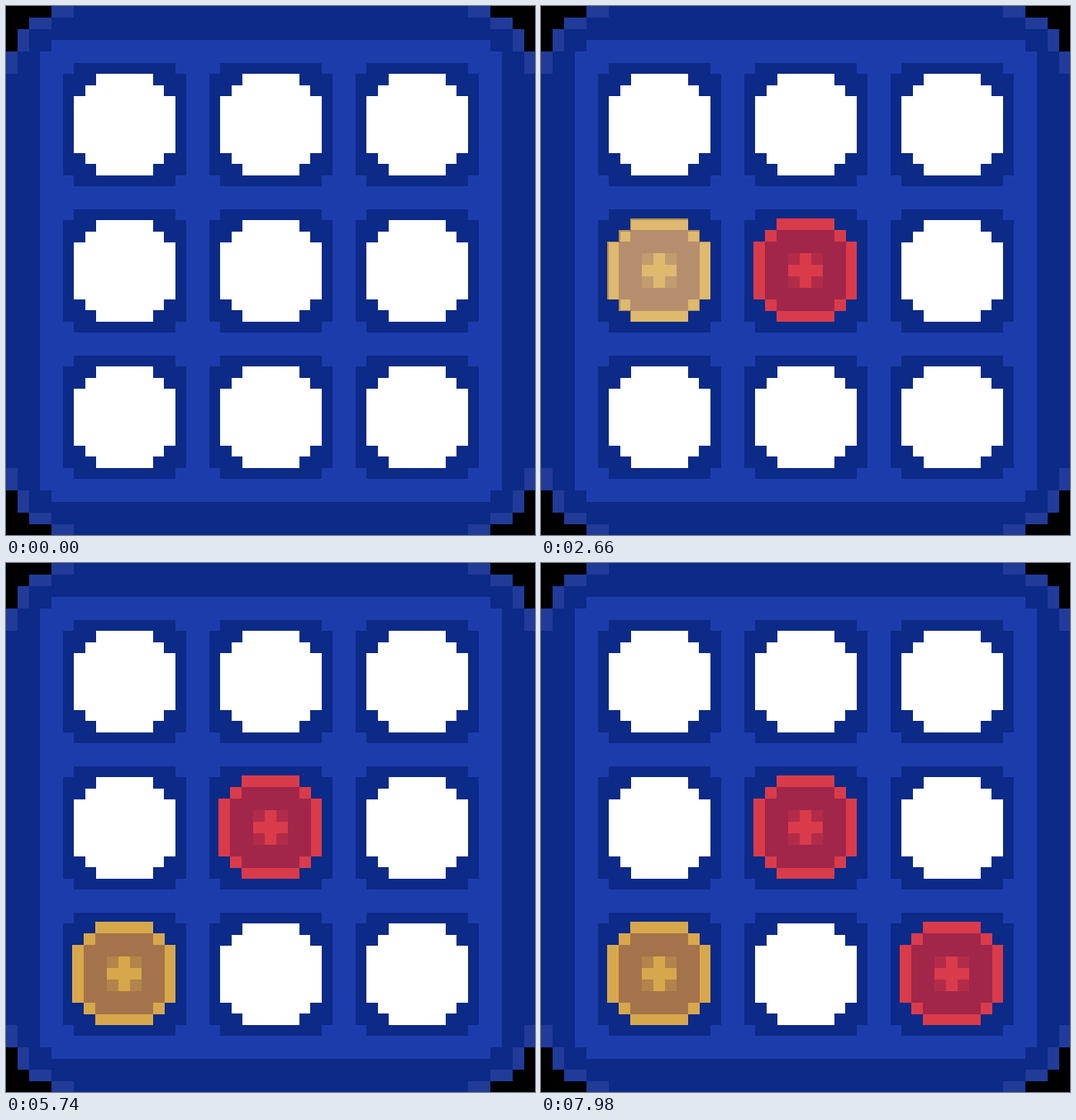
These frames come from a looping animation (640 px wide and 640 px high, 8 s). An HTML page without scripts:

```html
<!DOCTYPE html>
<html lang="en">
<head>
<meta charset="utf-8">
<title>Board game</title>
<style>
  html, body { margin: 0; width: 100%; height: 100%; overflow: hidden; background: #000; }
  svg { display: block; width: 100%; height: 100%; shape-rendering: crispEdges; }

  .red    { --rim: #d93b4b; --face: #a1264a; --mid: #b22c4a; }
  .yellow { --rim: #d7a84b; --face: #a5734b; --mid: #b4834b; }
  .rim  { fill: var(--rim); }
  .face { fill: var(--face); }
  .mid  { fill: var(--mid); }

  /* Every piece shares one clock; all moves are hard steps. */
  .piece { opacity: 0; animation: 8s step-end -1ms infinite; }
  .drop1 { animation-name: drop1; }
  .drop2 { animation-name: drop2; }
  .drop3 { animation-name: drop3; }
  .ghost.red    { animation-name: aim-red; }
  .ghost.yellow { animation-name: aim-yellow; }

  @keyframes drop1 { 0% { opacity: 0 } 25.375%, 100% { opacity: 1 } }
  @keyframes drop2 { 0% { opacity: 0 } 46.375%, 100% { opacity: 1 } }
  @keyframes drop3 { 0% { opacity: 0 } 72.625%, 100% { opacity: 1 } }

  @keyframes aim-red {
    0%      { opacity: 0;  transform: translate(354px, 354px) }
    0.875%  { opacity: .8; transform: translate(354px, 354px) }
    6.125%  { opacity: .8; transform: translate(354px, 177px) }
    14%     { opacity: .8; transform: translate(177px, 177px) }
    24.5%   { opacity: 0;  transform: translate(177px, 354px) }
    50.75%  { opacity: .8; transform: translate(177px, 354px) }
    56%     { opacity: .8; transform: translate(354px, 354px) }
    71.75%, 100% { opacity: 0; transform: translate(354px, 354px) }
  }
  @keyframes aim-yellow {
    0%      { opacity: 0;  transform: translate(0, 177px) }
    33.25%  { opacity: .8; transform: translate(0, 177px) }
    35.875% { opacity: .8; transform: translate(0, 354px) }
    45.5%   { opacity: 0;  transform: translate(354px, 177px) }
    76.125% { opacity: .8; transform: translate(354px, 177px) }
    80.5%   { opacity: .8; transform: translate(354px, 0) }
    84%     { opacity: .8; transform: translate(177px, 0) }
    90.125% { opacity: .8; transform: translate(0, 0) }
    99.75%, 100% { opacity: 0; transform: translate(0, 0) }
  }
</style>
</head>
<body>
<svg viewBox="0 0 640 640">
  <defs>
    <g id="hole">
      <path fill="#0c2a87" d="M82 69H205V82H218V205H205V218H82V205H69V82H82Z"/>
      <path fill="#fff" d="M109 82H178V96H191V109H205V178H191V191H178V205H109V191H96V178H82V109H96V96H109Z"/>
    </g>
    <g id="row">
      <use href="#hole"/>
      <use href="#hole" x="177"/>
      <use href="#hole" x="354"/>
    </g>
    <g id="disc">
      <path class="rim" d="M108 80H178V94H192V108H205V178H192V192H178V205H108V192H94V178H80V108H94V94H108Z"/>
      <path class="face" d="M108 94H178V108H192V178H178V192H108V178H94V108H108Z"/>
      <path class="mid" d="M122 122H164V164H122Z"/>
      <path class="rim" d="M136 122H150V136H164V150H150V164H136V150H122V136H136Z"/>
    </g>
  </defs>

  <!-- board -->
  <rect width="640" height="640"/>
  <path fill="#213b99" d="M55 0H586V14H613V28H627V55H640V586H627V613H613V627H586V640H55V627H28V613H14V586H0V55H14V28H28V14H55Z"/>
  <path fill="#0c2a87" d="M82 0H559V14H586V28H613V55H627V82H640V559H627V586H613V613H586V627H559V640H82V627H55V613H28V586H14V559H0V82H14V55H28V28H55V14H82Z"/>
  <path fill="#1d3cac" d="M55 41H586V55H600V586H586V600H55V586H41V55H55Z"/>
  <use href="#row"/>
  <use href="#row" y="177"/>
  <use href="#row" y="354"/>

  <!-- placed pieces -->
  <g class="piece red drop1"><use href="#disc" x="177" y="177"/></g>
  <g class="piece yellow drop2"><use href="#disc" y="354"/></g>
  <g class="piece red drop3"><use href="#disc" x="354" y="354"/></g>

  <!-- pieces being aimed -->
  <g class="piece ghost red"><use href="#disc"/></g>
  <g class="piece ghost yellow"><use href="#disc"/></g>
</svg>
</body>
</html>
```
